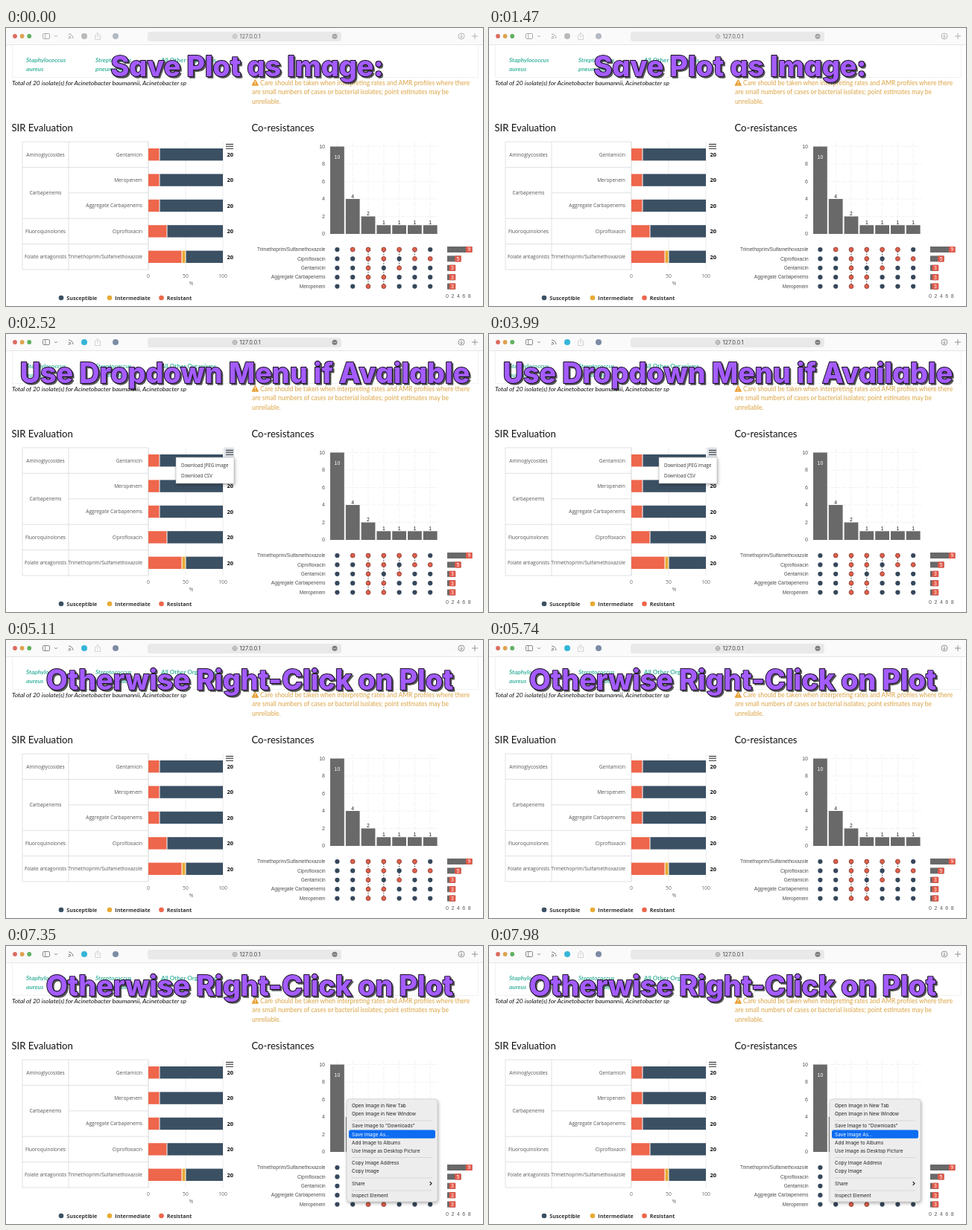
These frames come from a looping animation (640 px wide and 374 px high, 8000 ms). An HTML page:

```html
<!DOCTYPE html>
<html lang="en">
<head>
<meta charset="utf-8">
<title>Save plot as image</title>
<style>
  html, body { margin: 0; width: 100%; height: 100%; overflow: hidden; background: #fff; }
  svg { display: block; width: 640px; height: 374px; }
  .lato { font-family: Lato, sans-serif; }
  .chart { font-family: "Open Sans", sans-serif; }
  .arial { font-family: "Liberation Sans", Arial, sans-serif; }
  .ui { font-family: Inter, sans-serif; }
  .title {
    font: 800 37.6px Inter, sans-serif; font-feature-settings: "cv11";
    text-anchor: middle; stroke-linejoin: round; paint-order: stroke;
  }
  .shadow { filter: drop-shadow(1px 2px 2px rgba(0, 0, 0, .3)); }
</style>
</head>
<body>
<svg viewBox="0 0 640 374" xmlns="http://www.w3.org/2000/svg"></svg>
<script>
const svg = document.querySelector('svg');
const BLUE = '#3b5063', RED = '#ee664b', YELLOW = '#e8ab35', GREY = '#696969';
const LOOP = 8000;

function add(parent, tag, attrs = {}, text) {
  const node = document.createElementNS(svg.namespaceURI, tag);
  for (const key in attrs) node.setAttribute(key, attrs[key]);
  if (text !== undefined) node.textContent = text;
  return parent.appendChild(node);
}
const group = (parent, cls = '') => add(parent, 'g', { class: cls });
const rect = (p, x, y, width, height, fill, more) =>
  add(p, 'rect', { x, y, width, height, fill, ...more });
const path = (p, d, stroke, width = 1, more) =>
  add(p, 'path', { d, stroke, 'stroke-width': width, fill: 'none', ...more });
const dot = (p, cx, cy, r, fill, more) => add(p, 'circle', { cx, cy, r, fill, ...more });
const text = (p, x, y, size, fill, str, anchor = 'start', more) =>
  add(p, 'text', { x, y, 'font-size': size, fill, 'text-anchor': anchor, ...more }, str);

function toolbar(active) {
  const g = group(svg, 'ui');
  const ink = active ? '#7b7b7b' : '#a3a3a3', faint = '#c9c9c9';
  rect(g, 0, 0, 640, 22, '#fafafa');
  path(g, 'M0 22.5H640', '#e6e6e6');
  ['#dc6a60', '#dea24f', '#5fb060'].forEach((c, i) => dot(g, 12 + i * 9.6, 11, 2.9, c));
  rect(g, 49.5, 7.5, 9, 7, 'none', { rx: 1.3, stroke: ink, 'stroke-width': .9 });
  path(g, 'M52.7 7.5V14.5M65 10l2 2 2-2', ink, .8);
  path(g, 'M84 11a3 3 0 0 1 3 3M84 8a6 6 0 0 1 6 6', ink, 1);
  dot(g, 84.6, 13.7, .9, ink);
  dot(g, 105, 11, 4, active ? '#35b5d8' : '#b9b9b9');
  path(g, 'M121.5 9.5h-2v6h7v-6h-2M123 13V6.5M121.3 8l1.7-1.7 1.7 1.7', faint, .8);
  dot(g, 147, 11, 4, active ? '#7d8ca5' : '#b4bac3');
  rect(g, 190, 5, 260, 13, '#e9e9e9', { rx: 3.5 });
  dot(g, 307, 11.3, 2.8, 'none', { stroke: ink, 'stroke-width': .7 });
  path(g, 'M304.2 11.3h5.6M307 8.5v5.6', ink, .5);
  text(g, 327.5, 14, 7.4, active ? '#444' : '#666', '127.0.0.1', 'middle');
  dot(g, 441, 11.3, 3.5, ink);
  for (const x of [439.3, 441, 442.7]) dot(g, x, 11.3, .55, '#fff');
  dot(g, 611, 11, 4, 'none', { stroke: ink, 'stroke-width': .8 });
  path(g, 'M611 8.6v4.5M609.2 11.4l1.8 1.8 1.8-1.8M625 11h8M629 7v8', ink, .8);
  return g;
}

function page() {
  const g = group(svg, 'lato');
  path(g, 'M8.5 23V66.5H314M330 66.5H633.5V23', '#eceeef', .8);
  const tab = { 'font-weight': 700, 'font-style': 'italic' };
  [[27, 46, 'Staphylococcus'], [27, 58, 'aureus'], [120, 46, 'Streptococcus'], [120, 58, 'pneumoniae']]
    .forEach(([x, y, s]) => text(g, x, y, 8.2, '#3fb5a0', s, 'start', tab));
  text(g, 208, 46, 8.2, '#3fb5a0', 'All Other Organisms', 'start', { 'font-weight': 700 });
  text(g, 8, 76.5, 8.45, '#111', 'Total of 20 isolate(s) for Acinetobacter baumannii, Acinetobacter sp',
    'start', { 'font-style': 'italic' });

  const warn = '#dba445';
  path(g, 'M334.3 69.7L338.3 77H330.3Z', '#e9a035', 1.3, { fill: '#e9a035', 'stroke-linejoin': 'round' });
  path(g, 'M334.3 71.5v2.6M334.3 75.2v1', '#fff', 1);
  text(g, 341, 76.5, 8.5, warn, 'Care should be taken when interpreting rates and AMR profiles where there');
  text(g, 330, 89.2, 8.5, warn, 'are small numbers of cases or bacterial isolates; point estimates may be');
  text(g, 330, 102, 8.5, warn, 'unreliable.');
  text(g, 7.5, 139, 13.1, '#111', 'SIR Evaluation');
  text(g, 329.5, 139, 13.1, '#111', 'Co-resistances');
}

function sirChart() {
  const g = group(svg, 'chart');
  const rowY = i => 153 + i * 34.4;
  path(g, 'M191 153V325M241 153V325M291 153V325', '#e6e6e6', .8);
  path(g, 'M22 153V325M84 153V325M191 153V325' +
    [0, 1, 3, 4, 5].map(i => `M22 ${rowY(i)}H191`).join('') + `M84 ${rowY(2)}H191`, '#d6dade', .8);

  [['Aminoglycosides', .5], ['Carbapenems', 2], ['Fluoroquinolones', 3.5], ['Folate antagonists', 4.5]]
    .forEach(([s, row]) => text(g, 53, rowY(row) + 2.4, 6.6, '#555', s, 'middle'));

  [['Gentamicin', 15, 0], ['Meropenem', 15, 0], ['Aggregate Carbapenems', 15, 0],
   ['Ciprofloxacin', 25, 0], ['Trimethoprim/Sulfamethoxazole', 45, 5]]
    .forEach(([name, resistant, middle], i) => {
      const y = rowY(i + .5);
      text(g, 183, y + 2.4, 6.6, '#555', name, 'end');
      let x = 191;
      [[resistant, RED], [middle, YELLOW], [100 - resistant - middle, BLUE]].forEach(([w, fill]) => {
        if (!w) return;
        rect(g, x, y - 8.2, w, 16.4, fill);
        if (x > 191) path(g, `M${x} ${y - 8.2}v16.4`, '#fff', 1);
        x += w;
      });
      text(g, 296.5, y + 2.8, 7.5, '#111', '20', 'start', { 'font-weight': 700 });
    });

  [0, 50, 100].forEach(v => text(g, 191 + v, 336, 6.8, '#666', v, 'middle'));
  text(g, 248.5, 345.5, 6.5, '#666', '%', 'middle');
  [[74, BLUE, 'Susceptible'], [139, YELLOW, 'Intermediate'], [208.5, RED, 'Resistant']]
    .forEach(([x, fill, s]) => {
      dot(g, x, 363, 3.3, fill);
      text(g, x + 7.3, 365.6, 7.2, '#333', s, 'start', { 'font-weight': 700 });
    });
}

function upsetChart() {
  const g = group(svg, 'arial');
  const colX = i => 444.4 + i * 20.8;
  const valueY = v => 277 - v * 11.75;
  const counts = [10, 4, 2, 1, 1, 1, 1];

  let grid = '';
  counts.forEach((_, i) => grid += `M${colX(i)} 154V277`);
  for (let v = 0; v <= 10; v += 2) {
    grid += `M434 ${valueY(v)}H580`;
    text(g, 428, valueY(v) + 2.4, 7, '#555', v, 'end');
  }
  path(g, grid, '#f0f0f0', .8, { 'stroke-dasharray': '6 2' });

  counts.forEach((n, i) => {
    rect(g, colX(i) - 9.4, valueY(n), 18.8, n * 11.75, GREY);
    text(g, colX(i), n === 10 ? 176 : valueY(n) - 1.2, 6.8, n === 10 ? '#fff' : '#222', n, 'middle');
  });

  // Each row: label, total, and the columns in which it is resistant.
  const rows = [
    ['Trimethoprim/Sulfamethoxazole', 9, [1, 2, 3, 4, 5]],
    ['Ciprofloxacin', 5, [2, 3, 5, 6]],
    ['Gentamicin', 3, [2, 4]],
    ['Aggregate Carbapenems', 3, [2, 3]],
    ['Meropenem', 3, [2, 3]]
  ];
  const rowY = i => 298 + i * 12.4;
  [[2, 4], [3, 4], [4, 2], [5, 1]].forEach(([c, last]) =>
    path(g, `M${colX(c)} ${rowY(0)}V${rowY(last)}`, '#333', .9, { 'stroke-dasharray': '1.6 1.4' }));

  rows.forEach(([name, total, hits], r) => {
    const y = rowY(r), end = 592 + total * 3.72;
    text(g, 428.5, y + 2.2, 6.5, '#4c4c4c', name, 'end');
    counts.forEach((_, c) => hits.includes(c)
      ? dot(g, colX(c), y, 2.9, '#e2604b', { stroke: '#8c3c32', 'stroke-width': .9 })
      : dot(g, colX(c), y, 3.1, '#35475a'));
    rect(g, 592, y - 4, end - 592, 8, GREY);
    rect(g, end - 8.5, y - 4, 8.5, 8, '#e35848', { rx: 1 });
    text(g, end - 4.2, y + 2.4, 6.8, '#fff', total, 'middle');
  });
  for (let v = 0; v <= 8; v += 2) text(g, 592 + v * 3.72, 362.5, 7, '#555', v, 'middle');
}

function burger(open) {
  const g = group(svg);
  if (open) rect(g, 292.5, 152.5, 13.5, 13.5, '#dfe3ea', { rx: 1 });
  path(g, 'M295 156.5h10M295 159.4h10M295 162.3h10', '#555', 1.3);
  return g;
}

function dropdown() {
  const g = group(svg, 'chart');
  g.append(burger(true));
  rect(g, 228, 166, 78, 35, '#fff', { stroke: '#aaa', 'stroke-width': .5, class: 'shadow' });
  text(g, 235, 178.6, 6.2, '#333', 'Download JPEG image');
  text(g, 235, 192.8, 6.2, '#333', 'Download CSV');
  return g;
}

function contextMenu() {
  const g = group(svg, 'ui');
  rect(g, 457, 206, 122, 138, '#ededed', { rx: 4, stroke: '#c6c6c6', 'stroke-width': .6, class: 'shadow' });
  path(g, [235, 284.5, 312, 329].map(y => `M464 ${y}H572`).join(''), '#d2d2d2', .8);
  const highlight = rect(g, 460, 247.6, 116, 11.2, '#0c6cf2', { rx: 2.5 });
  const items = [
    ['Open Image in New Tab', 216.6], ['Open Image in New Window', 227.8],
    ['Save Image to "Downloads"', 244.2], ['Save Image As…', 255.5],
    ['Add Image to Albums', 266.6], ['Use Image as Desktop Picture', 277.7],
    ['Copy Image Address', 294.2], ['Copy Image', 305.3],
    ['Share', 321.8], ['Inspect Element', 338.3]
  ].map(([s, y]) => text(g, 464, y, 6.45, '#222', s));
  path(g, 'M568.7 317.2l2.3 2.3-2.3 2.3', '#222', 1.2);
  return { g, highlight, saveAs: items[3] };
}

function title(str, x, y) {
  const g = group(svg, 'title');
  const layer = (dx, dy, fill, stroke, width, opacity) => add(g, 'text',
    { x: x + dx, y: y + dy, fill, stroke, 'stroke-width': width, opacity }, str);
  layer(2, 2, '#222', '#222', 1.5, .75);
  layer(0, 0, '#a45cff', '#17101f', 2, 1);
  return g;
}

const idleBar = toolbar(false), activeBar = toolbar(true);
page();
sirChart();
upsetChart();
burger(false);
const titles = [
  title('Save Plot as Image:', 323.5, 64.5),
  title('Use Dropdown Menu if Available', 320.5, 65.5),
  title('Otherwise Right-Click on Plot', 327, 67)
];
const saveMenu = dropdown();
const context = contextMenu();

const CUT = [1610, 4760], DROPDOWN_OPEN = 2030, CONTEXT_OPEN = 6160, HOVER = 7280;
const show = (node, on) => node.setAttribute('visibility', on ? 'visible' : 'hidden');

function draw(now) {
  const t = now % LOOP;
  const scene = CUT.filter(c => t >= c).length;
  const hover = t >= HOVER;
  titles.forEach((node, i) => show(node, i === scene));
  show(idleBar, scene === 0);
  show(activeBar, scene > 0);
  show(saveMenu, scene === 1 && t >= DROPDOWN_OPEN);
  show(context.g, t >= CONTEXT_OPEN);
  show(context.highlight, hover && t >= CONTEXT_OPEN);
  context.saveAs.setAttribute('fill', hover ? '#fff' : '#222');
}

const start = performance.now();
function tick() {
  draw(performance.now() - start);
  requestAnimationFrame(tick);
}
tick();
</script>
</body>
</html>
```
